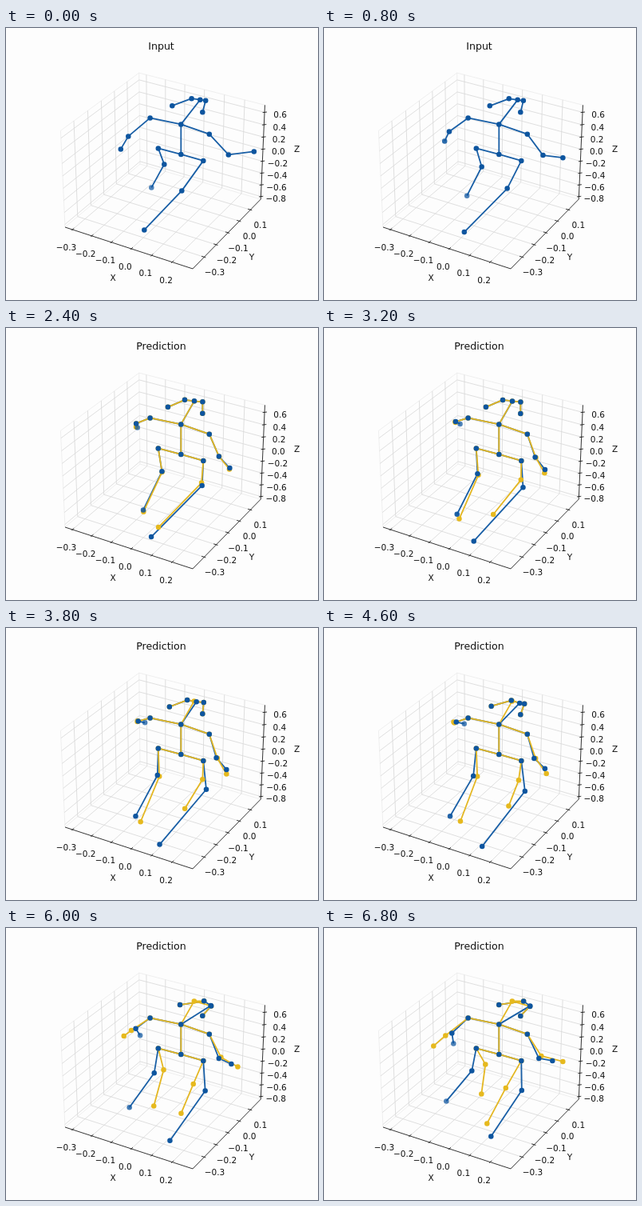
Animation of 391x340 px, one loop 7 s. Source, as an HTML page:

```html
<!DOCTYPE html>
<html lang="en">
<head>
<meta charset="utf-8">
<title>Pose prediction</title>
<style>
  html, body { margin: 0; width: 100%; height: 100%; overflow: hidden; background: #fdfdfd; }
  svg { display: block; width: 391px; height: 340px; }
  text { font: 10.5px "DejaVu Sans", sans-serif; text-anchor: middle; fill: #111; }
  #title { font-size: 12.6px; }
  .grid, .edge, .axis { fill: none; stroke-width: .85; }
  .grid { stroke: #dadada; }
  .edge { stroke: #ececec; }
  .axis { stroke: #111; }
  .bone { fill: none; stroke-width: 1.8; stroke-linejoin: round; }
  .true circle { fill: #0d559f; }
  .pred circle { fill: #e6b91e; }
  .bone.true { stroke: #195fa6; }
  .bone.pred { stroke: #e4b722; }
</style>
</head>
<body>
<svg viewBox="0 0 391 340">
  <g id="axes"></g>
  <text id="title" x="194.5" y="27.3">Input</text>
  <text x="134" y="316">X</text>
  <text x="308" y="290">Y</text>
  <text x="364.5" y="155">Z</text>
  <g id="body" transform="translate(.3 .4)"></g>
</svg>
<script>
const STEP = 200, COUNT = 35, LAST = COUNT - 1, PREDICT_AT = 10;
const [axes, title, body] = ['axes', 'title', 'body'].map(id => document.getElementById(id));

function add(parent, tag, attrs) {
  const el = document.createElementNS('http://www.w3.org/2000/svg', tag);
  for (const k in attrs) el.setAttribute(k, attrs[k]);
  return parent.appendChild(el);
}

// Perspective view of the unit box, elevation 30, azimuth -60.
function project(fx, fy, fz) {
  const x = (fx - .5) * 1.143, y = (fy - .5) * 1.143, z = (fz - .5) * .8574;
  const depth = 1 - (.433 * x - .75 * y + .5 * z) / 10;
  const u = .866 * x + .5 * y, v = -.25 * x + .433 * y + .866 * z;
  return [198.8 + 160.4 * u / depth, 172.9 - 160.4 * v / depth];
}

const path = pts => 'M' + pts.map(p => p.map(n => n.toFixed(2)).join()).join('L');
const line = (cls, ...pts) => add(axes, 'path', { class: cls, d: path(pts.map(p => project(...p))) });
const series = (n, start, gap) => Array.from({ length: n }, (_, i) => start + gap * i);

function tick(value, mark, label) {
  line('axis', ...mark);
  const [x, y] = project(...label);
  add(axes, 'text', { x, y: y + 9.4 }).textContent = value.toFixed(1).replace('-', '\u2212');
}

function drawAxes() {
  line('edge', [0, 0, 0], [0, 0, 1], [0, 1, 1], [1, 1, 1]);
  line('edge', [0, 0, 0], [0, 1, 0], [1, 1, 0]);
  line('edge', [0, 1, 0], [0, 1, 1]);
  const xs = series(6, .061, .157), ys = series(5, .157, .17), zs = series(8, .03, .128);
  xs.forEach(f => line('grid', [f, 0, 0], [f, 1, 0], [f, 1, 1]));
  ys.forEach(f => line('grid', [1, f, 0], [0, f, 0], [0, f, 1]));
  zs.forEach(f => line('grid', [0, 0, f], [0, 1, f], [1, 1, f]));
  line('axis', [0, 0, 0], [1, 0, 0], [1, 1, 0], [1, 1, 1]);
  const a = .02, b = -.012, d = .08;
  xs.forEach((f, i) => tick((i - 3) / 10, [[f, a, 0], [f, b, 0]], [f, -d, -d]));
  ys.forEach((f, i) => tick((i - 3) / 10, [[1 - a, f, 0], [1 - b, f, 0]], [1 + d, f, -d]));
  zs.forEach((f, i) => tick((i - 4) / 5, [[1 - a / 2, 1 - a / 2, f], [1 - b, 1 - b, f]], [1 + d, 1 + d, f]));
}

const still = {
  pelvis: [219, 157.5], thorax: [219, 120], rHip: [190.5, 150], lHip: [247, 165.5],
  rShoulder: [180.3, 112], lShoulder: [254.5, 132.3]
};

// Each limb joint glides through four evenly timed points.
const limbs = {
  rKnee: [[198, 170], [195.5, 178.5], [187, 184.5], [185, 178]],
  rFoot: [[182, 199], [172.5, 226], [158, 235], [153, 216]],
  lKnee: [[220, 203], [244.5, 196.5], [251.5, 203.5], [247.5, 202.5]],
  lFoot: [[173, 252], [181, 260], [197.5, 272.5], [209, 260]],
  rElbow: [[153, 135], [162.5, 119.5], [165.5, 117], [160, 131]],
  rWrist: [[143.5, 151], [163.5, 125], [175.5, 119], [162, 144]],
  lElbow: [[278.5, 158], [267, 160], [263, 162.5], [269, 162.5]],
  lWrist: [[310.5, 154], [281, 174], [276.5, 175.5], [286, 165.5]]
};

// Head facing ahead: x, y, then how far it follows the turn and the nod.
const head = {
  nose: [235.5, 91, 1, 6],
  rEye: [223.5, 89.5, 1.17, 1.5],
  rEar: [202.5, 98.5, .73, -3],
  lEye: [246, 92, .52, 5.5],
  lEar: [246, 106.5, 0, 3]
};

// Prediction error: final offset, then a sideways bulge on the way there.
const drift = {
  rKnee: [17, -8, 0, 3],
  rFoot: [44, -9, 0, 9],
  lKnee: [-20, -3, -2, -13],
  lFoot: [-5, -16, 35, -46],
  rElbow: [-8, 3, 0, 0],
  rWrist: [-25, 3, -6, -3],
  lElbow: [3, -3, 1, 1],
  lWrist: [13, 1, -2, 6]
};

const chains = [
  ['rFoot', 'rKnee', 'rHip', 'pelvis', 'lHip', 'lKnee', 'lFoot'],
  ['rWrist', 'rElbow', 'rShoulder', 'thorax', 'lShoulder', 'lElbow', 'lWrist'],
  ['pelvis', 'thorax', 'nose'],
  ['rEar', 'rEye', 'nose', 'lEye', 'lEar']
];
const names = Object.keys({ ...still, ...limbs, ...head });

function smooth(from, to, t) {
  const s = Math.min(1, Math.max(0, (t - from) / (to - from)));
  return s * s * (3 - 2 * s);
}

// Catmull-Rom curve through evenly spaced points, u from 0 to 1.
function glide(pts, u) {
  const last = pts.length - 1, i = Math.min(last - 1, Math.floor(u * last));
  const s = u * last - i, r = 1 - s;
  return [0, 1].map(c => {
    const p = k => pts[k] ? pts[k][c] : k < 0 ? 2 * pts[0][c] - pts[1][c] : 2 * pts[last][c] - pts[last - 1][c];
    const m0 = (p(i + 1) - p(i - 1)) / 2, m1 = (p(i + 2) - p(i)) / 2;
    return p(i) * r * r * (1 + 2 * s) + p(i + 1) * s * s * (3 - 2 * s) + s * r * (m0 * r - m1 * s);
  });
}

function truePose(t) {
  const pose = { ...still };
  for (const n in limbs) pose[n] = glide(limbs[n], t / LAST);
  const early = 1 - smooth(2, 13, t), late = smooth(15, 33, t);
  const turn = 7.5 * early + 22.5 * late;
  for (const n in head) {
    const [x, y, follow, nod] = head[n];
    pose[n] = [x + follow * turn, y + nod * late - 1.7 * early];
  }
  return pose;
}

// The predicted nose stays facing ahead while the limbs drift.
function predictedPose(pose, t) {
  const u = (t - PREDICT_AT) / (LAST - PREDICT_AT), bulge = Math.sin(Math.PI * u);
  const out = { ...pose, nose: head.nose.slice(0, 2) };
  for (const n in drift) {
    const [dx, dy, bx, by] = drift[n], [x, y] = pose[n];
    out[n] = [x + dx * u * u + bx * bulge, y + dy * u * u + by * bulge];
  }
  return out;
}

function makeDots(cls) {
  const group = add(body, 'g', { class: cls }), dots = {};
  for (const n of names) dots[n] = add(group, 'circle', { r: 3.25 });
  return { group, dots };
}

function place(fig, pose) {
  fig.bones.setAttribute('d', chains.map(c => path(c.map(n => pose[n]))).join(''));
  for (const n of names) {
    const [cx, cy] = pose[n];
    fig.dots[n].setAttribute('cx', cx);
    fig.dots[n].setAttribute('cy', cy);
  }
}

drawAxes();
const [real, guess] = ['true', 'pred'].map(cls => ({ bones: add(body, 'path', { class: 'bone ' + cls }) }));
Object.assign(guess, makeDots('pred'));
Object.assign(real, makeDots('true'));

function show(t) {
  const predicting = t >= PREDICT_AT, pose = truePose(t);
  title.textContent = predicting ? 'Prediction' : 'Input';
  place(real, pose);
  // Far joints fade with depth.
  real.dots.rWrist.setAttribute('opacity', 1 - .27 * smooth(0, 8, t));
  real.dots.rFoot.setAttribute('opacity', 1 - .28 * Math.abs(Math.cos(Math.PI * t / 38)));
  for (const el of [guess.bones, guess.group]) el.style.display = predicting ? '' : 'none';
  if (predicting) place(guess, predictedPose(pose, t));
}

let shown = -1;
function run() {
  const t = Math.floor(performance.now() / STEP) % COUNT;
  if (t !== shown) show(shown = t);
  requestAnimationFrame(run);
}
run();
</script>
</body>
</html>
```
